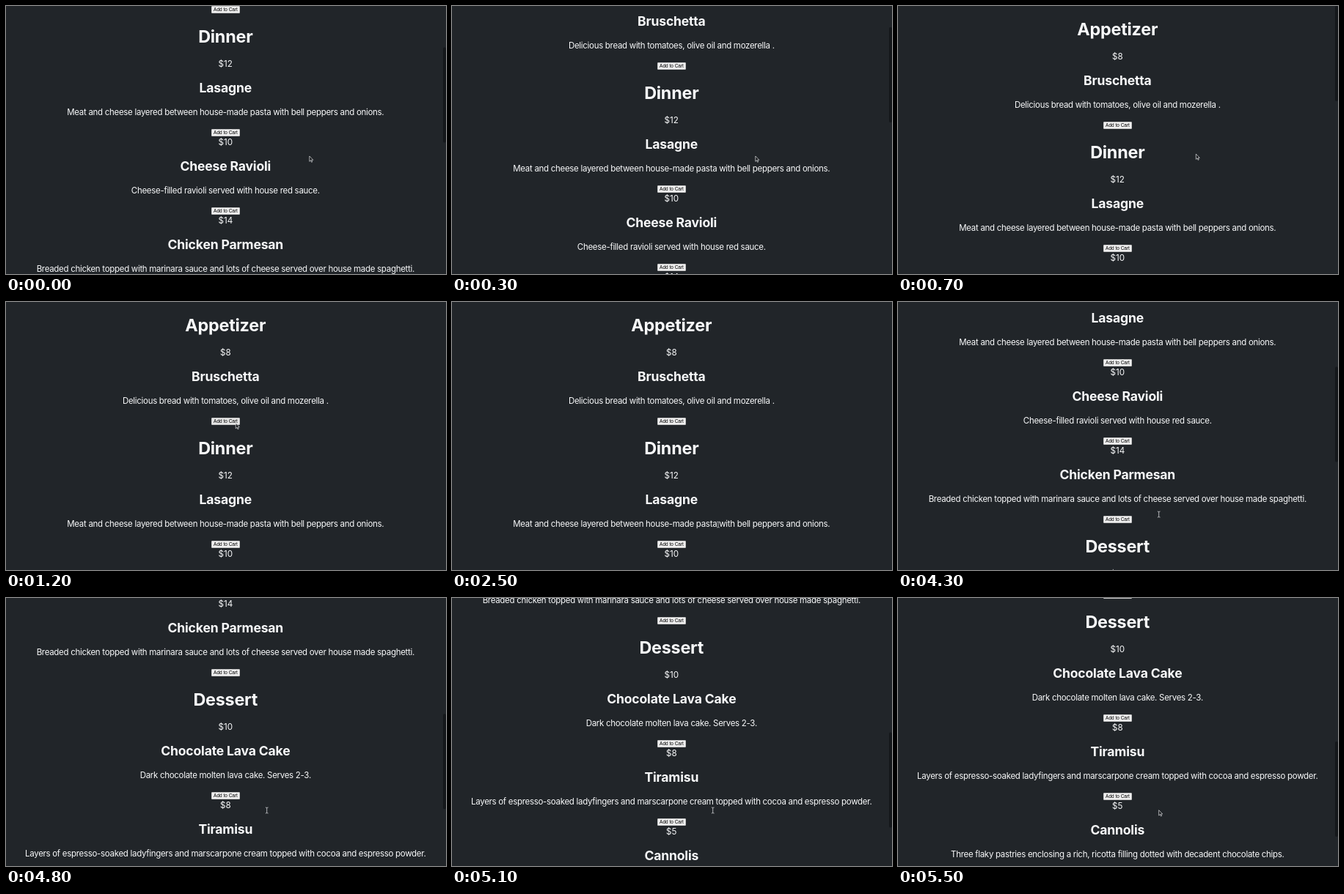
Recreate the animation shown at these times as an HTML page. Size 600x366 px, loop 5.7 s.

```html
<!DOCTYPE html>
<html lang="en">
<head>
<meta charset="utf-8">
<title>Menu</title>
<style>
html, body { margin: 0; width: 100%; height: 100%; overflow: hidden; background: #212529; }
#stage { position: absolute; left: 0; top: 0; width: 600px; height: 366px; overflow: hidden;
  background: #212529; color: #f8f9fa; font-family: Inter, "Open Sans", sans-serif; font-optical-sizing: none; }
#page { position: absolute; left: 0; top: 0; width: 598.6px; }
#page > * { position: absolute; margin: 0; white-space: nowrap; }
h1, h2, p { left: 0; width: 100%; height: 30px; line-height: 30px; text-align: center; }
h1 { font-size: 23.4px; font-weight: 700; letter-spacing: -.25px; }
h2 { font-size: 17.6px; font-weight: 700; letter-spacing: -.19px; }
p { font-size: 11.5px; letter-spacing: -.3px; }
.price { font-size: 11.7px; letter-spacing: 0; }
.btn { left: 280px; width: 39px; height: 10px; box-sizing: border-box; border: 1px solid #c4c4c4;
  border-radius: 1px; background: #efefef; color: #000; text-align: center;
  font: 6.5px/8px "Liberation Sans", Arial, sans-serif; }
#thumb { position: absolute; left: 596px; top: 0; width: 4px; height: 130px; background: #14171a; border-radius: 2px; }
svg { position: absolute; left: 0; top: 0; }
</style>
</head>
<body>
<div id="stage">
  <div id="page"></div>
  <div id="thumb"></div>
  <svg width="600" height="366">
    <path id="arrow" d="M0 0V7.3L1.7 5.7L2.8 8.3L3.9 7.8L2.8 5.3H5Z" fill="#15171a" stroke="#e4e6e8" stroke-width=".7"/>
    <path id="beam" d="M-1.8-4Q0-4 0-3Q0-4 1.8-4M0-3V3M-1.8 4Q0 4 0 3Q0 4 1.8 4" fill="none" stroke="#c3c6c9" stroke-width=".9"/>
  </svg>
</div>
<script>
const LOOP = 5700, STEP = 100;
const $ = id => document.getElementById(id);

const menu = [
  ["Appetizer", [
    ["$8", "Bruschetta", "Delicious bread with tomatoes, olive oil and mozerella ."]]],
  ["Dinner", [
    ["$12", "Lasagne", "Meat and cheese layered between house-made pasta with bell peppers and onions."],
    ["$10", "Cheese Ravioli", "Cheese-filled ravioli served with house red sauce."],
    ["$14", "Chicken Parmesan", "Breaded chicken topped with marinara sauce and lots of cheese served over house made spaghetti."]]],
  ["Dessert", [
    ["$10", "Chocolate Lava Cake", "Dark chocolate molten lava cake. Serves 2-3."],
    ["$8", "Tiramisu", "Layers of espresso-soaked ladyfingers and marscarpone cream topped with cocoa and espresso powder."],
    ["$5", "Cannolis", "Three flaky pastries enclosing a rich, ricotta filling dotted with decadent chocolate chips."]]]
];

const buttons = [];

// Adds one line of text, centred on y
function add(tag, text, y, name = "", half = 15) {
  const el = document.createElement(tag);
  el.textContent = text;
  el.className = name;
  el.style.top = y - half + "px";
  $("page").append(el);
  return el;
}

let y = 31;
for (const [title, items] of menu) {
  add("h1", title, y + .6);
  for (const [price, name, about] of items) {
    add("p", price, y + 37.7, "price");
    add("h2", name, y + 71);
    add("p", about, y + 103.8);
    buttons.push({ el: add("div", "Add to Cart", y + 132, "btn", 5), y: y + 132 });
    y += 107;
  }
  y += 61;
}

const scrolls = [
  { from: 0, to: 610, y: 0 },
  { from: 2600, to: 3200, y: 162 },
  { from: 4100, to: 5500, y: 549, rush: .61 }
];
const moves = [
  { from: 600, to: 1200, x: 313.3, y: 165.5 },
  { from: 1500, to: 2000, x: 308, y: 329 },
  { from: 2200, to: 2500, x: 363, y: 304, beam: true },
  { from: 3100, to: 3500, x: 305.3, y: 282, beam: true },
  { from: 3500, to: 3700, x: 308, y: 276 },
  { from: 3800, to: 4000, x: 355.7, y: 290, beam: true },
  { from: 5100, to: 5200, x: 355.7, y: 289.7 }
];

const clamp = v => Math.max(0, Math.min(1, v));
const smooth = v => v * v * (3 - 2 * v);

// Eases one coordinate through a list of moves
function follow(value, list, t, key) {
  for (const m of list) {
    const p = clamp((t - m.from) / (m.to - m.from)) ** (m.rush || 1);
    value += (m[key] - value) * smooth(p);
  }
  return value;
}

function draw(t) {
  const s = Math.round(follow(158, scrolls, t, "y"));
  const px = follow(413.8, moves, t, "x"), py = follow(205, moves, t, "y");

  $("page").style.transform = `translateY(${-s}px)`;
  $("thumb").style.transform = `translateY(${s * .357}px)`;
  $("thumb").style.opacity = t > scrolls[1].from ? 1 : clamp((1200 - t) / 400);

  for (const b of buttons) {
    const over = Math.abs(px - 299.5) < 19.5 && Math.abs(py + s - b.y) < 5;
    b.el.style.background = over ? "#e5e5e5" : "#efefef";
  }

  const last = moves.filter(m => m.to <= t).pop();
  const moving = moves.some(m => t > m.from && t < m.to);
  const shape = last && last.beam && !moving ? "beam" : "arrow";
  for (const id of ["arrow", "beam"]) {
    $(id).setAttribute("transform", `translate(${px} ${py})`);
    $(id).style.display = id === shape ? "" : "none";
  }
}

const start = performance.now();
function tick() {
  const t = (performance.now() - start) % LOOP;
  draw(Math.floor(t / STEP) * STEP);
  requestAnimationFrame(tick);
}
tick();
</script>
</body>
</html>
```
